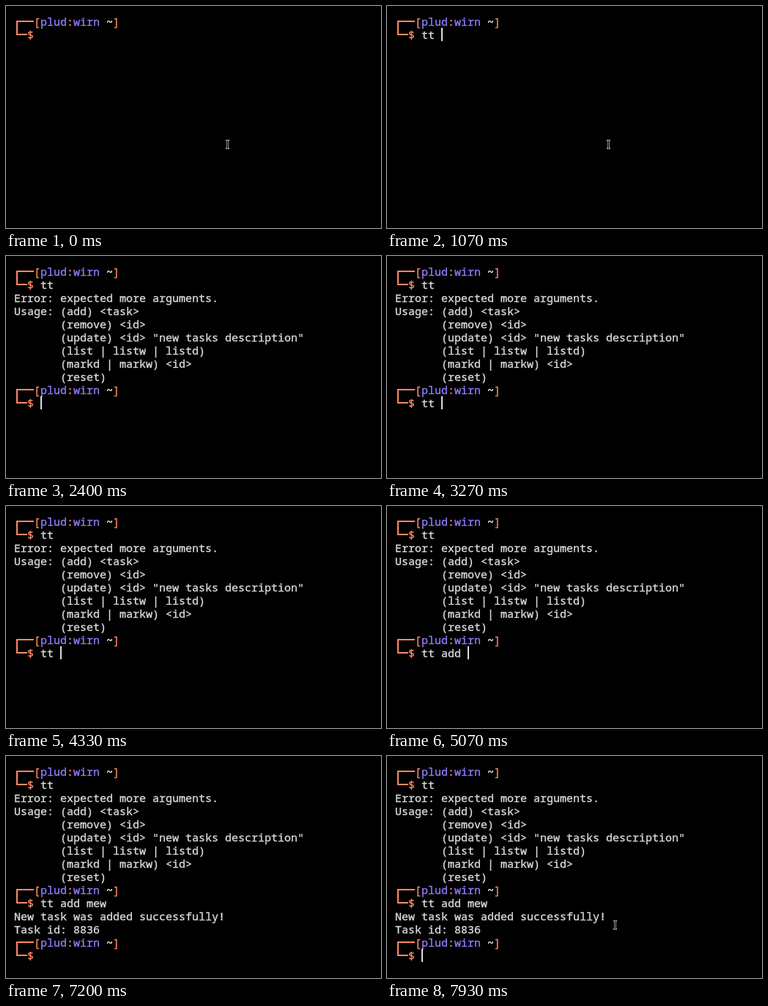
Animation of 512x304 px, one loop 8 s. Source, as an HTML page with a canvas:

```html
<!DOCTYPE html>
<html lang="en">
<head>
<meta charset="utf-8">
<title>Terminal task list</title>
<style>
  html, body { margin: 0; height: 100%; overflow: hidden; background: #000; }
  canvas { display: block; }
</style>
</head>
<body>
<canvas id="stage" width="512" height="304"></canvas>
<script>
const ctx = document.getElementById("stage").getContext("2d");
const LOOP = 8000, CELL = 9, LINE = 18, LEFT = 11, TOP = 12;
const ORANGE = "#ff8a65", PURPLE = "#917dff", TEXT = "#dcdcdc";

const USAGE = [
  "Error: expected more arguments.",
  "Usage: (add) <task>",
  "       (remove) <id>",
  '       (update) <id> "new tasks description"',
  "       (list | listw | listd)",
  "       (markd | markw) <id>",
  "       (reset)"
];
const ADDED = ["New task was added successfully!", "Task id: 8836"];

// [start ms, prompt index, typed text, caret visible]
const STEPS = [
  [0, 0, "", 0], [200, 0, "", 1], [670, 0, "", 0],
  [730, 0, "t", 1], [870, 0, "tt", 1], [1070, 0, "tt ", 1],
  [1330, 1, "", 1], [1870, 1, "", 0], [2400, 1, "", 1],
  [2870, 1, "t", 1], [3070, 1, "tt", 1], [3270, 1, "tt ", 1],
  [3870, 1, "tt ", 0], [4330, 1, "tt ", 1], [4400, 1, "tt a", 1],
  [4670, 1, "tt ad", 1], [4800, 1, "tt add", 1], [5070, 1, "tt add ", 1],
  [5200, 1, "tt add m", 1], [5330, 1, "tt add me", 1], [5400, 1, "tt add mew", 1],
  [5600, 2, "", 1], [6200, 2, "", 0], [6670, 2, "", 1],
  [7200, 2, "", 0], [7670, 2, "", 1]
];

// [start ms, x, y] of the mouse pointer; no position means hidden
const POINTER = [
  [0, 299, 182], [2200], [7670, 299, 182], [7730, 301, 192],
  [7870, 306, 212], [7930, 308, 224]
];

const at = (list, t) => list.filter(s => s[0] <= t).pop();

function rect(x, y, w, h, color) {
  ctx.fillStyle = color;
  ctx.fillRect(x, y, w, h);
}

// A thin outline gives the letters a medium weight.
function write(text, col, row, color = TEXT) {
  ctx.fillStyle = ctx.strokeStyle = color;
  [...text].forEach((ch, i) => {
    const x = LEFT + (col + i) * CELL, y = TOP + row * LINE + 15;
    ctx.fillText(ch, x, y);
    ctx.strokeText(ch, x, y);
  });
}

function prompt(row, typed) {
  const y = TOP + row * LINE + 8;
  rect(14, y, 24, 2, ORANGE);
  rect(14, y, 2, 20, ORANGE);
  rect(14, y + LINE, 15, 2, ORANGE);
  write("[", 3, row, ORANGE);
  write("plud", 4, row, PURPLE);
  write(":", 8, row, ORANGE);
  write("wirn", 9, row, PURPLE);
  write("~", 14, row, "#fff");
  write("]", 15, row, ORANGE);
  write("$", 2, row + 1, ORANGE);
  write(typed, 4, row + 1);
}

function pointer(x, y) {
  const light = "#909090";
  for (const end of [y + 1, y + 12]) rect(x + 1, end, 5, 2, light);
  rect(x + 2, y + 2, 3, 11, light);
  rect(x + 3, y + 2, 1, 11, "#000");
}

function draw(t) {
  const [, stage, typed, caret] = at(STEPS, t);
  const [, px, py] = at(POINTER, t);
  const row = [0, 9, 13][stage];

  rect(0, 0, 512, 304, "#000");
  ctx.font = '15px "Noto Sans Mono", "DejaVu Sans Mono", monospace';
  ctx.lineWidth = 0.35;
  if (stage > 0) {
    prompt(0, "tt");
    USAGE.forEach((s, i) => write(s, 0, 2 + i));
  }
  if (stage > 1) {
    prompt(9, "tt add mew");
    ADDED.forEach((s, i) => write(s, 0, 11 + i));
  }
  prompt(row, typed);
  if (caret) rect(LEFT + (4 + typed.length) * CELL, TOP + (row + 1) * LINE, 2, LINE, TEXT);
  if (px) pointer(px, py);
}

const start = performance.now();
function tick() {
  draw((performance.now() - start) % LOOP);
  requestAnimationFrame(tick);
}
tick();
</script>
</body>
</html>
```
